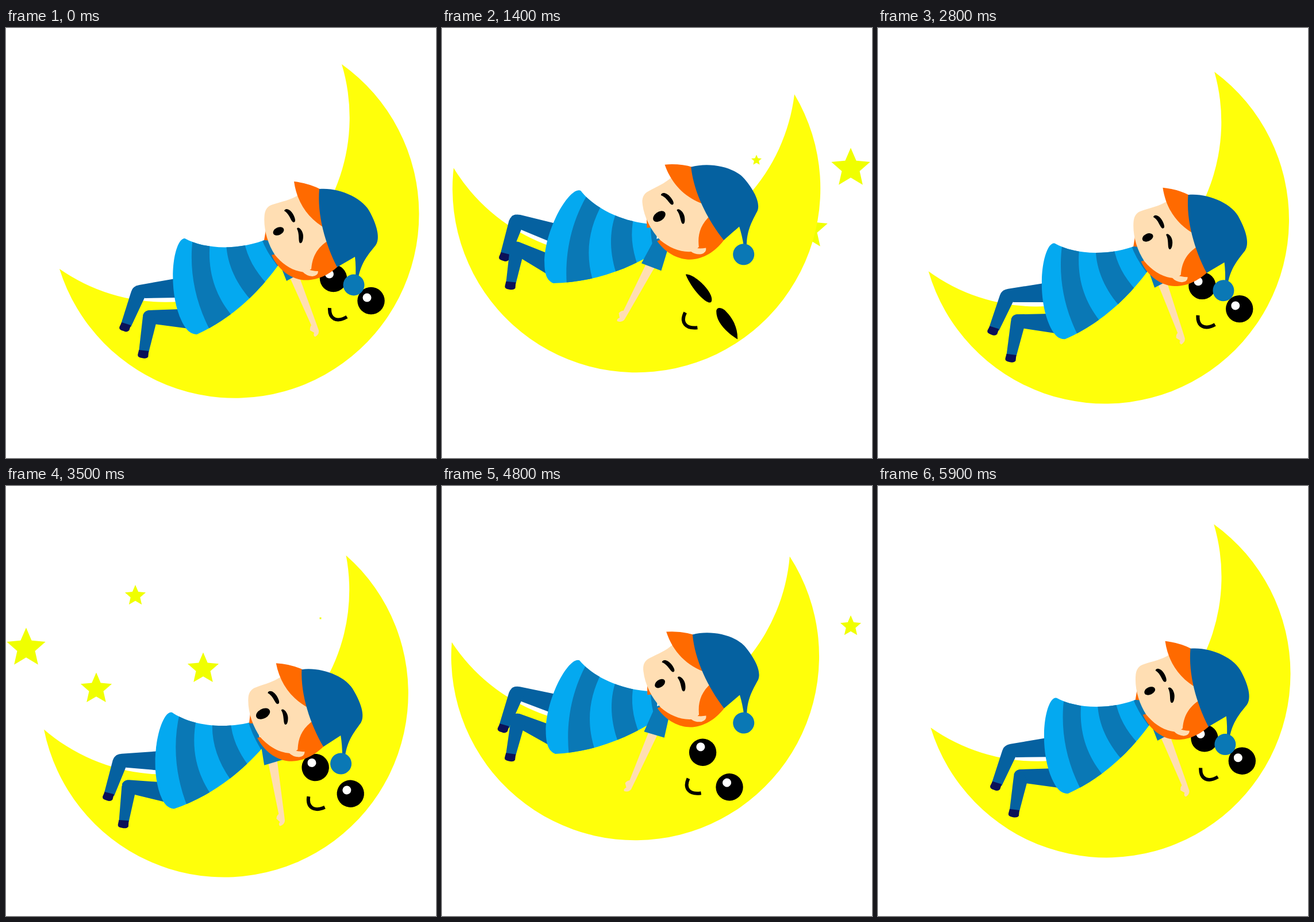
An HTML page for the animation above (6.01 s loop, 748 by 748 pixels).

```html
<!DOCTYPE html>
<html lang="en">
<head>
<meta charset="utf-8">
<title>Sleepy moon</title>
<style>
  html, body { margin: 0; width: 100%; height: 100%; overflow: hidden; background: #fff; }
  svg { display: block; width: 100vw; height: 100vh; }
  .moon { fill: #ffff0a; }
  .star { fill: #f0ff00; }
  .sky { fill: #04a9f0; }
  .mid { fill: #0a78b5; }
  .deep { fill: #0561a0; }
  .navy { fill: #0b1158; }
  .skin { fill: #ffdeb3; }
  .hair { fill: #ff6a00; }
  .white { fill: #fff; }
  .line { fill: none; stroke: #000; }
</style>
</head>
<body>
<svg viewBox="0 0 748 748">
  <defs>
    <clipPath id="dress">
      <path d="M311 366C345 385 405 388 457 366L474 412C440 459 395 504 332 533C321 532 316 527 310 518C284 475 286 395 303 371Q307 366 311 366Z"/>
    </clipPath>
  </defs>
  <path id="stars" class="star"/>
  <g id="swing">
    <path class="moon" d="M93 419A320 320 0 1 0 584 63A321 321 0 0 1 93 419Z"/>
    <g id="open">
      <circle cx="569.5" cy="435.5" r="23.7"/>
      <circle cx="635" cy="474.5" r="23.7"/>
      <circle class="white" cx="562.5" cy="428" r="7.5"/>
      <circle class="white" cx="628" cy="469" r="7.5"/>
    </g>
    <g id="closed">
      <path d="M537 426C550 418 598 436 597 452C594 460 560 448 537 426Z"/>
      <path d="M612 464C608 456 618 452 628 457C645 464 658 476 665 493C645 490 620 482 612 464Z"/>
    </g>
    <path class="line" stroke-width="6" d="M563 487C562 506 575 513 593 502.5"/>

    <path class="deep" d="M300 435L232 447Q222 449 219 456L242 470L300 469Z"/>
    <g id="shinBack">
      <path class="deep" d="M218 458Q221 450 230 448L243 465L217 520L200 514Z"/>
      <path class="navy" d="M201 512L217 517L214 526Q210 530 204 527Q196 525 197 520Z"/>
    </g>
    <path class="deep" d="M305 489L249 491Q240 492 238 500L258 515L322 523.5Z"/>
    <g id="shinFront">
      <path class="deep" d="M238 502Q240 492 249 491L262 510L248 564L231 562Z"/>
      <path class="navy" d="M231 560L248 562L247 572Q244 576 236 574Q228 573 229 568Z"/>
    </g>

    <g clip-path="url(#dress)">
      <path class="sky" d="M280 350H480V540H280Z"/>
      <path class="mid" d="M325 365C318 420 328 475 356 528L392 499C362 462 350 420 355 370Z"/>
      <path class="mid" d="M383 370C383 405 397 440 425 472L454 445C433 422 420 400 414 370Z"/>
      <path class="mid" d="M444 365Q452 388 472 414L490 400L460 360Z"/>
    </g>

    <g id="arm">
      <path class="skin" d="M492 430L507 424L539 512L544 526Q545 533 538 537Q534 536 536 530L529 526Q528 521 531 517Z"/>
      <path class="mid" d="M474 388L471 397L488 440L520 422L496 385Z"/>
    </g>

    <g id="head">
      <path class="hair" d="M453 345L449 369L462 370ZM462 395C475 424 500 438 520 438.5C545 439 565 427 580 412L560 370Z"/>
      <path class="skin" d="M508 291C495 299 480 302 464 307Q450 311 449.5 328C448 350 455 375 468 395C482 412 500 424 522 425L545 410L570 370L553 340Z"/>
      <path class="hair" d="M501 267Q527 270 548 281L558 350C525 332 506 303 501 267ZM562 369C540 382 532 400 531 422C550 436 568 424 580 412Z"/>
      <path class="skin" d="M520 418Q532 423 543 423Q543 431 533 432Q522 431 516 424Z"/>
      <path class="deep" d="M545 280C578 277 622 295 634 322C651 355 648 371 643 378C630 394 618 408 613 434H608Q609 415 607 398L576 416C555 375 541 325 545 280Z"/>
      <circle class="mid" cx="605" cy="447" r="18.5"/>
      <path d="M484 318C486 312 495 315 500 325C503 331 505 338 500 338C495 336 494 324 484 318ZM506 349C509 344 517 353 517 362C517 369 515 376 511 374C508 370 511 358 506 349Z"/>
      <ellipse id="yawn" rx="10" ry="6.5"/>
    </g>
  </g>
</svg>
<script>
const LOOP = 6010, SWING = 3000, STEP = 100;
const el = id => document.getElementById(id);
const place = (id, transform) => el(id).setAttribute('transform', transform);
const turn = (id, angle, x, y) => place(id, `rotate(${angle} ${x} ${y})`);
const show = (id, visible) => el(id).style.display = visible ? '' : 'none';

// x, y, time of full size
const stars = [
  [35, 282, 600], [343, 318, 700], [157, 353, 700], [225, 191, 800],
  [547, 230, 1000], [637, 351, 1300], [711, 244, 1500]
];

function starPath(x, y, size) {
  const points = [];
  for (let i = 0; i < 10; i++) {
    const r = size * (i % 2 ? 17.5 : 38), a = i * Math.PI / 5;
    points.push(`${x + r * Math.sin(a)} ${y - r * Math.cos(a)}`);
  }
  return `M${points.join('L')}Z`;
}

function starSize(phase, peak) {
  const d = Math.abs(phase - peak) / 600;
  return d < 1 ? (1 + Math.cos(Math.PI * d)) / 2 : 0;
}

// 0 at the right end of the swing, 1 at the left end
const swing = t => (1 - Math.cos(2 * Math.PI * t / SWING)) / 2;

function draw(t) {
  const phase = t % SWING, s = swing(phase), lead = swing(phase + 90);
  const x = 400 + s * (-91 + s * (283.1 + s * (-1266.1 + s * (1741.6 - 728 * s))));
  const y = 324 + s * (246.4 + s * (-427.4 + 134.9 * s));

  place('swing', `translate(${x} ${y}) rotate(${24 * s}) translate(-400 -324)`);
  turn('head', -35.4 * s, 462, 384);
  turn('arm', 26.5 * s, 475, 377);
  turn('shinBack', -27 * lead, 231, 461);
  turn('shinFront', -24 * lead, 250, 503);

  const yawn = phase < 1800 ? 1 + Math.sin(Math.PI * phase / 1800) ** 2 / 2 : 1;
  place('yawn', `translate(474 353.5) rotate(-25) scale(${yawn})`);

  const asleep = phase >= 700 && phase < 1600;
  show('open', !asleep);
  show('closed', asleep);

  el('stars').setAttribute('d', stars
    .map(([x, y, peak]) => starPath(x, y, starSize(phase, peak))).join(''));
}

function tick() {
  const step = Math.floor(performance.now() % LOOP / STEP);
  draw(Math.min(step, 59) * STEP);
  requestAnimationFrame(tick);
}
tick();
</script>
</body>
</html>
```
